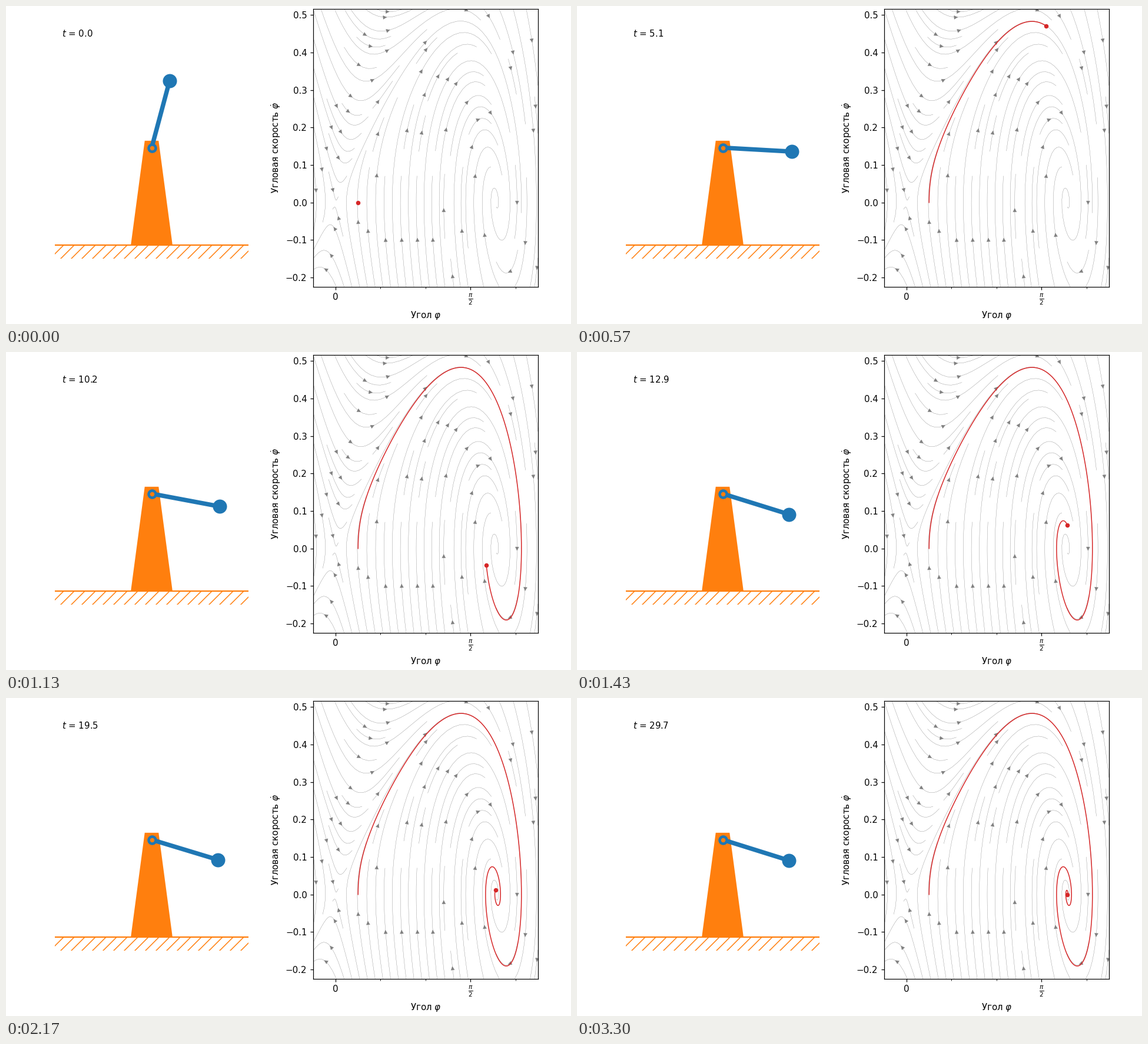
A matplotlib script that plays this animation: 960 by 540 pixels, repeating every 3330 ms.

```python
import numpy as np
import matplotlib.pyplot as plt
from matplotlib.animation import FuncAnimation
from matplotlib.patches import Polygon, Rectangle
from matplotlib.ticker import MultipleLocator

W, H, DPI = 960, 540, 108
TICKS, TICK_MS = 111, 30
STEPS, SUBSTEPS, STEP_TIME = 100, 10, 0.3

# Inverted pendulum with a torsion spring and viscous friction
GRAVITY, SPRING, FRICTION = 0.981, 0.5, 0.507
START_ANGLE = np.pi / 12


def acceleration(phi, omega):
    return GRAVITY * np.sin(phi) - SPRING * phi - FRICTION * omega


def rate(state):
    return np.array([state[1], acceleration(*state)])


def simulate(state, step, count):
    """Integrate the motion with classic Runge-Kutta steps."""
    path = [np.array(state)]
    for _ in range(count):
        s = path[-1]
        k1 = rate(s)
        k2 = rate(s + step / 2 * k1)
        k3 = rate(s + step / 2 * k2)
        k4 = rate(s + step * k3)
        path.append(s + step / 6 * (k1 + 2 * k2 + 2 * k3 + k4))
    return np.array(path).T


def pixel_axes(left, top, width, height):
    return fig.add_axes([left / W, 1 - (top + height) / H, width / W, height / H])


phi, omega = simulate((START_ANGLE, 0.0), STEP_TIME / SUBSTEPS, STEPS * SUBSTEPS)

plt.rcParams["font.family"] = "DejaVu Sans"
plt.rcParams["font.size"] = 10
fig = plt.figure(figsize=(W / DPI, H / DPI), dpi=DPI, facecolor="white")

# Pendulum, measured in rod lengths from the pivot
SCALE, PIVOT_X, PIVOT_Y = 117.8, 247.5, 240.6
REACH, GROUND, BOTTOM, TOP = 1.4, -1.4, -1.6, 1.8
scene = pixel_axes(PIVOT_X - REACH * SCALE, PIVOT_Y - TOP * SCALE,
                   2 * REACH * SCALE, (TOP - BOTTOM) * SCALE)
scene.set_xlim(-REACH, REACH)
scene.set_ylim(BOTTOM, TOP)
scene.axis("off")

scene.add_patch(Rectangle((-REACH, BOTTOM), 2 * REACH, GROUND - BOTTOM,
                          fill=False, hatch="//", edgecolor="C1", linewidth=0))
scene.plot([-REACH, REACH], [GROUND, GROUND], color="C1", lw=1.5)
scene.add_patch(Polygon([(-0.3, GROUND), (-0.1, 0.1), (0.1, 0.1), (0.3, GROUND)],
                        facecolor="C1", linewidth=0))
rod, = scene.plot([], [], color="C0", lw=5, zorder=3)
bob, = scene.plot([], [], "o", color="C0", ms=15, zorder=4)
scene.plot(0, 0, "o", ms=8, mfc="C1", mec="C0", mew=3, zorder=5)
clock = scene.text(-1.295, 1.6, "")

# Phase portrait
phase = pixel_axes(521.8, 4.7, 382, 471.9)
trail, = phase.plot([], [], color="C3", lw=1, zorder=3)
dot, = phase.plot([], [], "o", color="C3", ms=4, zorder=4)

margin = 0.05 * np.ptp(omega)
x_range = (-np.pi / 12, 3 * np.pi / 4)
y_range = (omega.min() - margin, omega.max() + margin)
grid_phi, grid_omega = np.meshgrid(np.linspace(*x_range, 100),
                                   np.linspace(*y_range, 100))
phase.streamplot(grid_phi, grid_omega, grid_omega,
                 acceleration(grid_phi, grid_omega),
                 color="gray", linewidth=0.25)
phase.set_xlim(*x_range)
phase.set_ylim(*y_range)
phase.set_xticks([0, np.pi / 2], ["0", r"$\frac{\pi}{2}$"])
phase.xaxis.set_minor_locator(MultipleLocator(np.pi / 6))
phase.yaxis.set_major_locator(MultipleLocator(0.1))
phase.set_xlabel(r"Угол $\varphi$")
phase.set_ylabel(r"Угловая скорость $\dot{\varphi}$")


def update(tick):
    # The motion makes 30 steps a second, nine for every ten ticks
    step = (18 * tick + 15) // 20
    n = step * SUBSTEPS
    x, y = np.sin(phi[n]), np.cos(phi[n])
    rod.set_data([0, x], [0, y])
    bob.set_data([x], [y])
    clock.set_text(f"$t$ = {step * STEP_TIME:.1f}")
    trail.set_data(phi[:n + 1], omega[:n + 1])
    dot.set_data([phi[n]], [omega[n]])
    return rod, bob, clock, trail, dot


anim = FuncAnimation(fig, update, frames=TICKS, interval=TICK_MS,
                     repeat=True, repeat_delay=0, blit=False)
plt.show()
```
